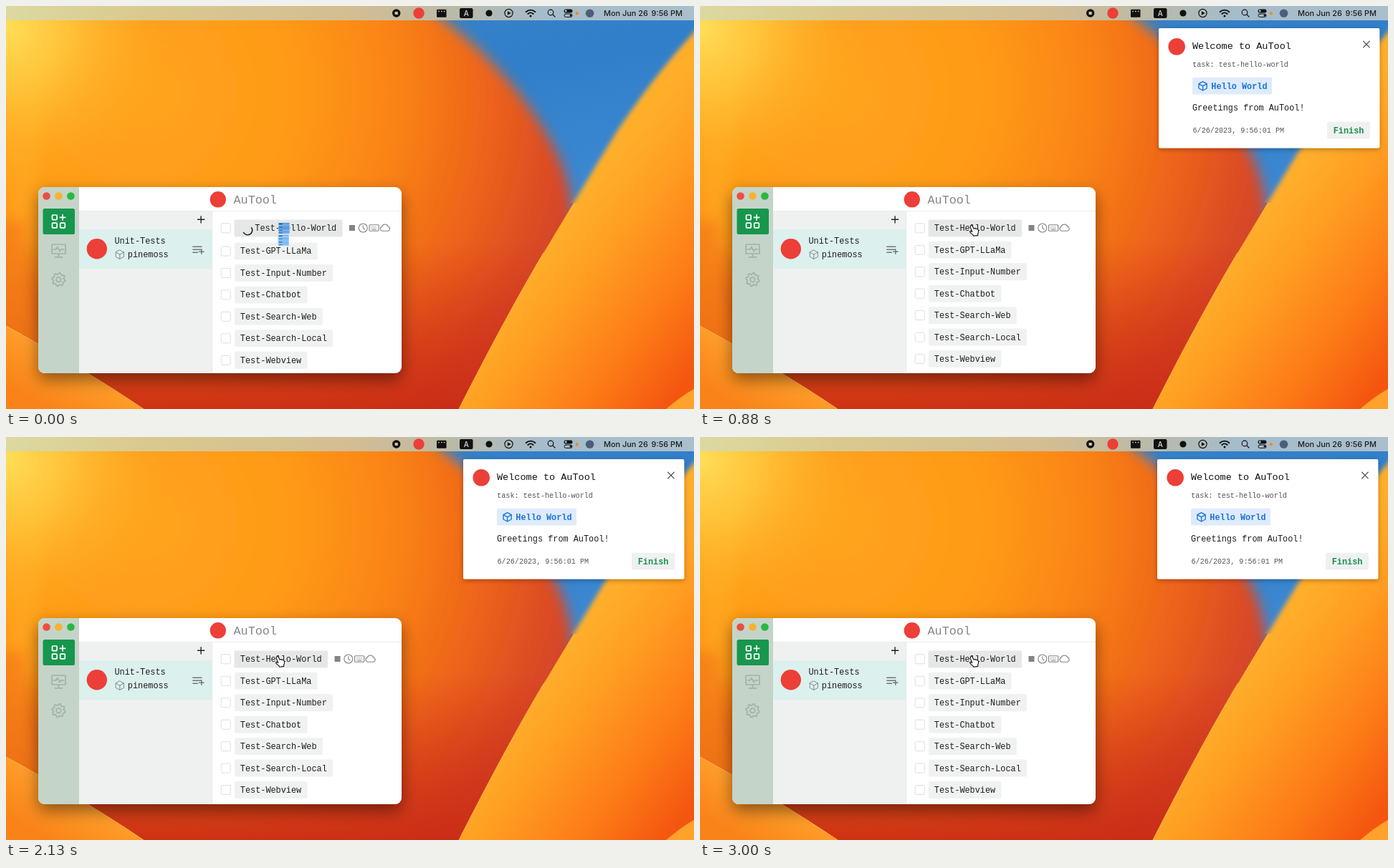
An HTML page for the animation above (3120 ms loop, 960 by 563 pixels).

```html
<!DOCTYPE html>
<html lang="en">
<head>
<meta charset="utf-8">
<title>Task launcher</title>
<style>
html, body { margin: 0; width: 100%; height: 100%; overflow: hidden; background: #f60; }
svg { display: block; width: 960px; height: 563px; }
text { font: 11.87px "Liberation Mono", "Courier New", monospace; fill: #1d1d1d; white-space: pre; }
.bar { font: 500 10.9px Inter, Roboto, sans-serif; }
.small { font-size: 10.15px; fill: #555; }
.line { fill: none; stroke-linecap: round; stroke-linejoin: round; }
.busy, .idle, .shift, .hand, .glitch, .popup { animation: 3120ms step-end infinite; }
.busy { animation-name: busy; }
.idle { animation-name: idle; }
.shift { animation-name: shift; }
.hand { animation-name: hand; }
.glitch { animation-name: glitch; }
.popup { animation-name: popup; }
.spin { transform-origin: 336.5px 310.8px; animation: spin 3120ms steps(25) infinite; }
@keyframes busy { 0% { opacity: 1 } 12.18%, 100% { opacity: 0 } }
@keyframes idle { 0% { opacity: 0 } 12.18%, 100% { opacity: 1 } }
@keyframes shift { 0% { transform: translateY(1.7px) } 12.18%, 100% { transform: none } }
@keyframes hand { 0% { opacity: 0 } 4.17%, 100% { opacity: 1 } }
@keyframes glitch { 0% { opacity: 1 } 4.17%, 100% { opacity: 0 } }
@keyframes popup {
  0% { opacity: 0; transform: translateX(40px) }
  24.04% { opacity: 1; transform: translateX(40px) }
  28.2% { opacity: 1; transform: translateX(2px) }
  32.05%, 100% { opacity: 1; transform: translateX(0) }
}
@keyframes spin { to { transform: rotate(1123.2deg) } }
</style>
</head>
<body>
<svg viewBox="0 0 960 563">
  <defs>
    <linearGradient id="sky" x1="0" y1="0" x2=".3" y2="1">
      <stop stop-color="#3a83c6"/><stop offset=".35" stop-color="#317fca"/><stop offset="1" stop-color="#4a93dc"/>
    </linearGradient>
    <radialGradient id="bloom" gradientUnits="userSpaceOnUse" cx="190" cy="120" r="640">
      <stop stop-color="#ffa41c"/><stop offset=".33" stop-color="#ff9a18"/><stop offset=".55" stop-color="#fa8416"/>
      <stop offset=".75" stop-color="#ee641a"/><stop offset=".9" stop-color="#dc4c24"/><stop offset="1" stop-color="#cf4230"/>
    </radialGradient>
    <radialGradient id="sun" gradientUnits="userSpaceOnUse" cx="0" cy="30" r="230">
      <stop stop-color="#ffde58"/><stop offset=".4" stop-color="#ffcb40" stop-opacity=".75"/>
      <stop offset="1" stop-color="#ffab20" stop-opacity="0"/>
    </radialGradient>
    <linearGradient id="ember" x1="0" y1="0" x2="0" y2="1">
      <stop stop-color="#cc2c14" stop-opacity="0"/><stop offset="1" stop-color="#c92b14" stop-opacity=".9"/>
    </linearGradient>
    <linearGradient id="leaf" gradientUnits="userSpaceOnUse" x1="770" y1="310" x2="985" y2="480">
      <stop stop-color="#ffae2c"/><stop offset=".25" stop-color="#ff9f22"/>
      <stop offset=".65" stop-color="#fd7c17"/><stop offset="1" stop-color="#f4560f"/>
    </linearGradient>
    <linearGradient id="low" gradientUnits="userSpaceOnUse" x1="100" y1="495" x2="60" y2="563">
      <stop stop-color="#ffa02c"/><stop offset="1" stop-color="#f98318"/>
    </linearGradient>
    <linearGradient id="menu">
      <stop stop-color="#dcd9a0"/><stop offset=".2" stop-color="#dac98f"/><stop offset=".5" stop-color="#d4bd92"/>
      <stop offset=".66" stop-color="#b9baa9"/><stop offset=".78" stop-color="#a5bccb"/><stop offset="1" stop-color="#a9bfcc"/>
    </linearGradient>
    <filter id="soft" x="-10%" y="-10%" width="120%" height="120%"><feGaussianBlur stdDeviation="9"/></filter>
    <filter id="haze"><feGaussianBlur stdDeviation="3"/></filter>
    <filter id="drop" x="-20%" y="-20%" width="140%" height="150%"><feDropShadow dx="0" dy="9" stdDeviation="11" flood-opacity=".45"/></filter>
    <filter id="lift" x="-10%" y="-10%" width="120%" height="130%"><feDropShadow dx="0" dy="2" stdDeviation="3" flood-opacity=".3"/></filter>
    <clipPath id="upper"><path d="M0 0H960V275H0Z"/></clipPath>
    <clipPath id="lower"><path d="M0 275H960V563H0Z"/></clipPath>
    <clipPath id="frame"><rect x="45" y="253" width="507" height="260" rx="9"/></clipPath>
    <path id="petal" d="M990 5C930 65 880 133 850 179C815 236 782 292 750 345C712 409 671 486 632 563L632 590H990Z"/>
    <g id="cube" class="line"><path d="M0-6.2L5.6-3.2V3.2L0 6.2L-5.6 3.2V-3.2ZM-5.6-3.2L0 0L5.6-3.2M0 0V6.2"/></g>
    <g id="tools" class="line" stroke="#808585" stroke-width="1.1">
      <rect x="458.5" y="306" width="8" height="8" fill="#808585" stroke="none"/>
      <circle cx="477.8" cy="310" r="6"/><path d="M477.8 306.5V310.3L480.2 312"/>
      <rect x="486.5" y="305.8" width="13.2" height="8.4" rx="1"/>
      <path d="M489 308.3H497.5M489 310.2H497.5" stroke-dasharray=".2 2"/><path d="M490.5 312.2H495.8"/>
      <path d="M504.5 314.2A3.2 3.2 0 0 1 504.2 308A4.6 4.6 0 0 1 512.8 308A3.2 3.2 0 0 1 512.6 314.2Z"/>
    </g>
  </defs>

  <!-- wallpaper -->
  <rect width="960" height="563" fill="url(#sky)"/>
  <path d="M-40-40H535C595 10 640 38 676 77C725 127 761 182 779 230C797 285 800 340 790 600H-40Z" fill="url(#bloom)" filter="url(#soft)"/>
  <path d="M0 0H110C60 70 45 180 42 300L0 440Z" fill="#ffb52a" opacity=".35" filter="url(#soft)"/>
  <rect width="300" height="300" fill="url(#sun)"/>
  <rect y="330" width="790" height="233" fill="url(#ember)"/>
  <path d="M-30 300H25C30 380 35 440 90 500L-30 460Z" fill="#f47c15" opacity=".75" filter="url(#soft)"/>
  <path d="M0 447C62 481 128 520 192 563H0Z" fill="url(#low)"/>
  <path d="M0 447C62 481 128 520 192 563" class="line" stroke="#ffb24a" stroke-width="1"/>
  <g clip-path="url(#upper)"><use href="#petal" fill="url(#leaf)" filter="url(#haze)"/></g>
  <g clip-path="url(#lower)"><use href="#petal" fill="url(#leaf)"/></g>
  <path d="M750 345C712 409 671 486 632 563" class="line" stroke="#ffc04a" stroke-width="1.2" opacity=".7"/>
  <path d="M921 563C934 552 947 542 960 535V563Z" fill="#ffa12b"/>

  <!-- menu bar -->
  <rect width="960" height="20" fill="url(#menu)"/>
  <g fill="#111">
    <circle cx="544.7" cy="10" r="5.7"/><rect x="542.6" y="7.9" width="4.2" height="4.2" rx=".6" fill="#d4c6a8"/>
    <circle cx="576" cy="10" r="7.7" fill="#ec3f38"/>
    <rect x="601" y="4.8" width="13.5" height="11" rx="1.2"/>
    <path d="M603.2 7.4H612.6" stroke="#d0c8b4" stroke-width="1.5" stroke-dasharray="1.6 2.2"/>
    <rect x="633" y="3" width="18.5" height="14" rx="2.2"/>
    <text class="bar" x="642.2" y="13.6" text-anchor="middle" style="fill:#ddd;font-size:10px">A</text>
    <circle cx="674" cy="10" r="4.6"/>
    <path d="M699.9 7.2L704.7 10L699.9 12.8Z"/>
    <circle cx="732" cy="14" r="1.5"/>
    <rect x="778.5" y="4.4" width="12" height="5" rx="2.5"/>
    <circle cx="781.2" cy="6.9" r="1.4" fill="#c5cbc9"/>
    <circle cx="788" cy="13.2" r="1.4"/>
    <circle cx="796.8" cy="10.2" r="2.2" fill="#f58a1e"/>
    <circle cx="814.6" cy="10.2" r="5.8" fill="#4d5d78"/>
  </g>
  <g class="line" stroke="#111" stroke-width="1.2">
    <circle cx="701.5" cy="10" r="5.6"/>
    <path d="M725.6 8.2A9.2 9.2 0 0 1 738.4 8.2M728.3 11A5.3 5.3 0 0 1 735.7 11" stroke-width="1.9"/>
    <circle cx="760" cy="9" r="3.8"/><path d="M762.8 11.8L766 15"/>
    <rect x="779" y="11" width="11" height="4.4" rx="2.2" stroke-width="1"/>
  </g>
  <text class="bar" x="834" y="14">Mon Jun 26</text>
  <text class="bar" x="944" y="14" text-anchor="end">9:56 PM</text>

  <!-- main window -->
  <rect x="45" y="253" width="507" height="260" rx="9" fill="#fff" filter="url(#drop)"/>
  <g clip-path="url(#frame)">
    <rect x="45" y="253" width="57" height="260" fill="#c5d4c9"/>
    <rect x="102" y="286" width="186" height="227" fill="#eff1f1"/>
    <rect x="102" y="312" width="186" height="55" fill="#dcf0ed"/>
    <path d="M102 286.5H552M287.8 286V513" stroke="#e9ebeb"/>
  </g>
  <circle cx="56.5" cy="265.5" r="5.3" fill="#ee4d43"/>
  <circle cx="73.4" cy="265.5" r="5.3" fill="#f5b32f"/>
  <circle cx="90.4" cy="265.5" r="5.3" fill="#2cb840"/>
  <rect x="51.5" y="283" width="44.5" height="36" rx="2.5" fill="#17964d"/>
  <g class="line" stroke="#fff" stroke-width="1.7">
    <rect x="64.5" y="292" width="6.6" height="6.6" rx=".8"/><rect x="64.5" y="303.2" width="6.6" height="6.6" rx=".8"/>
    <rect x="75.7" y="303.2" width="6.6" height="6.6" rx=".8"/><path d="M79 291.6V299M75.3 295.3H82.7"/>
  </g>
  <g class="line" stroke="#a4b0a8" stroke-width="1.7">
    <rect x="64" y="333" width="19" height="13" rx="1"/><path d="M73.5 346V350.5M68.5 350.8H78.5M66.5 339.8H70L72 336.6L75 342.6L77 339.8H80.5"/>
    <circle cx="73.4" cy="382.2" r="3.3"/>
    <path id="gear"/>
  </g>
  <circle cx="295.8" cy="270.3" r="11.2" fill="#ec3f38"/>
  <text x="317.5" y="275.5" style="font-size:16.8px;fill:#858585">AuTool</text>
  <path d="M267 298.3H277.2M272.1 293.2V303.4" stroke="#222" stroke-width="1.4"/>
  <circle cx="126.8" cy="339.3" r="14.2" fill="#ec3f38"/>
  <text x="151.5" y="332">Unit-Tests</text>
  <use href="#cube" x="158.8" y="347.2" stroke="#858b8b" stroke-width="1"/>
  <text x="169.8" y="351">pinemoss</text>
  <path class="line" d="M260.8 336.3H273M260.8 340.3H273M260.8 344.3H267.5M272.8 339.8V346.4M269.6 343.2H276" stroke="#707877" stroke-width="1.4"/>

  <g id="rows">
    <rect x="300.2" y="303.8" width="13" height="13" rx="1.5" fill="#fff" stroke="#dcdede"/>
    <g class="busy">
      <rect x="318.5" y="298.5" width="151" height="24" rx="2" fill="#e6e7e7"/>
      <path class="line spin" d="M342.7 309.8A6.2 6.2 0 0 1 331.6 316.6" stroke="#222" stroke-width="1.6"/>
      <text x="347.3" y="314.3">Test-Hello-World</text>
      <use href="#tools" x="20.4"/>
    </g>
    <g class="idle">
      <rect x="318.5" y="298.5" width="130.5" height="24" rx="2" fill="#e6e7e7"/>
      <text x="326.8" y="314.3">Test-Hello-World</text>
      <use href="#tools"/>
    </g>
    <g id="list" class="shift"></g>
  </g>

  <g class="glitch" fill="none">
    <path d="M388 303V318M387 319V335" stroke="#c8e3fb" stroke-width="16"/>
    <path d="M388 303V318" stroke="#2a78d2" stroke-width="15" stroke-dasharray="1.3 .9"/>
    <path d="M387.5 320V335" stroke="#3b91e6" stroke-width="14" stroke-dasharray="1.1 1.3"/>
    <path d="M383 304V334" stroke="#145aa8" stroke-width="5" stroke-dasharray="1 3.2"/>
  </g>
  <path class="hand" d="M377.4 307.2C378.2 306.2 379.6 306.4 380.2 307.6L382 311.2C382.9 310.3 384 310.5 384.4 311.3C385.2 310.6 386.2 310.9 386.5 311.8C387.4 311.3 388.2 312 388.3 313C388.7 315.4 388.5 317.2 387.6 318.6L387.8 320.4L381.6 321.2L380.8 319.6C379.2 318.8 377.7 317.2 376.6 315.7C376.3 314.5 377.6 314 378.6 314.7L379.8 315.5L377.3 309.4Z" fill="#fff" stroke="#111" stroke-width="1.1" stroke-linejoin="round"/>

  <!-- notification -->
  <g class="popup">
    <rect x="638" y="31" width="308.3" height="167.6" rx="2" fill="#fff" filter="url(#lift)"/>
    <circle cx="663.2" cy="56.8" r="11.8" fill="#ec3f38"/>
    <text x="685" y="60.3" style="font-size:13.53px;fill:#111">Welcome to AuTool</text>
    <path class="line" d="M923.6 49.2L932.2 57.8M932.2 49.2L923.6 57.8" stroke="#444" stroke-width="1.2"/>
    <text class="small" x="685.2" y="84.8">task: test-hello-world</text>
    <rect x="685" y="99.8" width="111" height="23.8" rx="2" fill="#dfebfb"/>
    <use href="#cube" x="699.6" y="111.8" stroke="#1b74dc" stroke-width="1.4"/>
    <text x="711.3" y="115.6" style="fill:#1b74dc;font-weight:bold">Hello World</text>
    <text x="685" y="145.8">Greetings from AuTool!</text>
    <text class="small" x="685.5" y="177">6/26/2023, 9:56:01 PM</text>
    <rect x="873" y="161.8" width="60" height="23.6" rx="2" fill="#eff1f1"/>
    <text x="881.7" y="177.6" style="fill:#1a8f4c;font-weight:bold">Finish</text>
  </g>
</svg>
<script>
const names = ["GPT-LLaMa", "Input-Number", "Chatbot", "Search-Web", "Search-Local", "Webview"];
const row = (name, i) => {
  const label = "Test-" + name, y = 340.8 + i * 30.45;
  return `<rect x="300.2" y="${y - 6.5}" width="13" height="13" rx="1.5" fill="#fff" stroke="#dcdede"/>
    <rect x="319" y="${y - 12}" width="${label.length * 7.12 + 16}" height="24" rx="2" fill="#f0f2f2"/>
    <text x="326.8" y="${y + 4}">${label}</text>`;
};
document.getElementById("list").innerHTML = names.map(row).join("");

// eight-toothed outline around the settings icon
const teeth = [];
for (let i = 0; i < 32; i++) {
  const a = (i + .5) * Math.PI / 16, r = i % 4 < 2 ? 9.4 : 7.4;
  teeth.push((73.4 + r * Math.cos(a)).toFixed(1) + " " + (382.2 + r * Math.sin(a)).toFixed(1));
}
document.getElementById("gear").setAttribute("d", "M" + teeth.join("L") + "Z");
</script>
</body>
</html>
```
